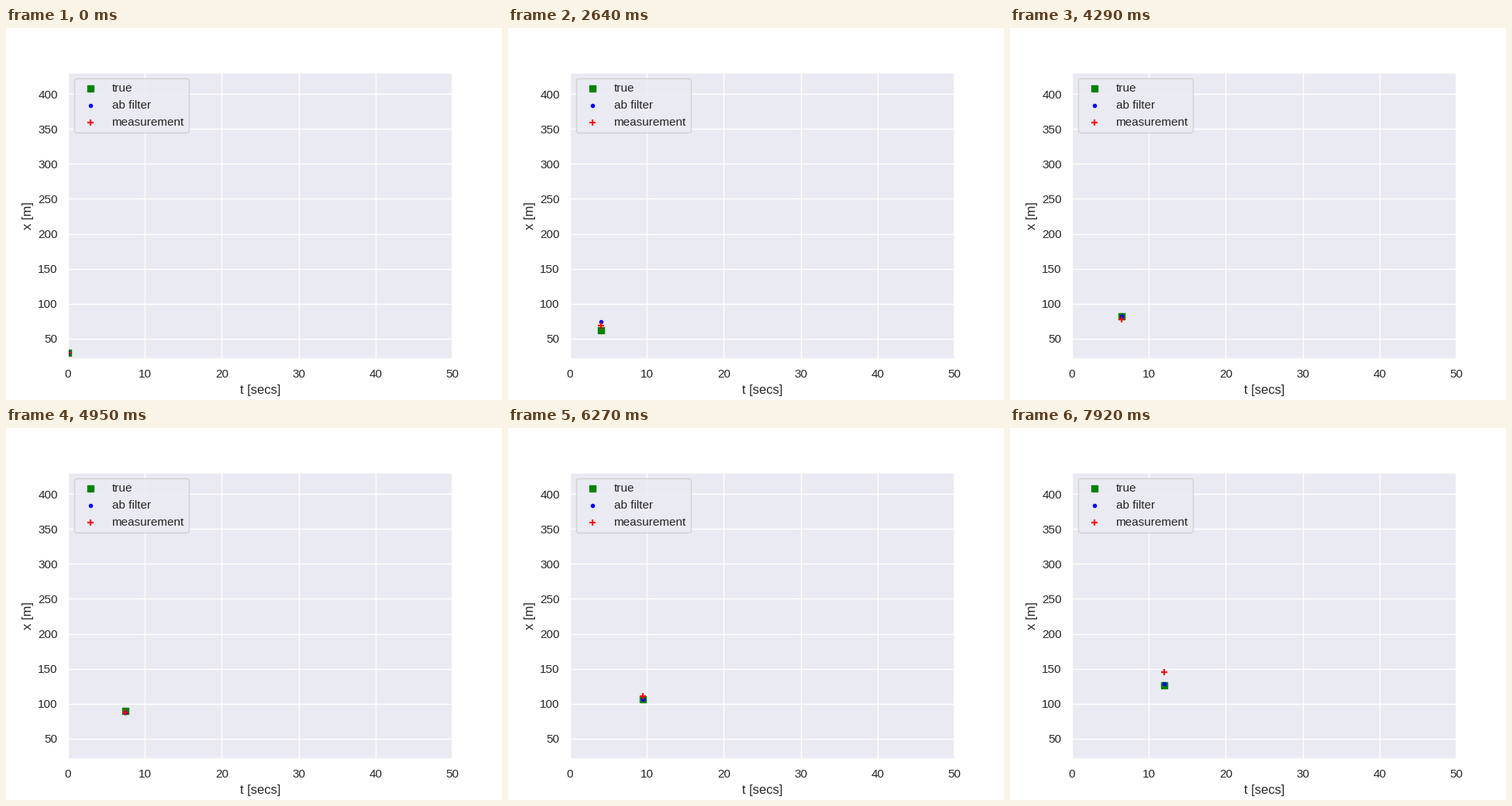
Recreate the animation shown at these times as a matplotlib script. Size 640 by 480 pixels, loop 8000 ms.

```python
import numpy as np
import matplotlib.pyplot as plt
from matplotlib.animation import FuncAnimation

INK = "0.15"
plt.rcParams.update({
    "font.family": "Liberation Sans",
    "text.color": INK,
    "axes.labelcolor": INK,
    "axes.labelsize": 12,
    "axes.facecolor": "#EAEAF2",
    "axes.edgecolor": "white",
    "axes.linewidth": 1.25,
    "axes.axisbelow": True,
    "axes.grid": True,
    "grid.color": "white",
    "grid.linewidth": 1,
    "lines.linewidth": 1.5,
    "lines.markersize": 6,
    "legend.fontsize": 11,
    "legend.scatterpoints": 1,
})
for axis, side in (("xtick", "bottom"), ("ytick", "left")):
    plt.rcParams.update({
        f"{axis}.color": INK,
        f"{axis}.labelsize": 11,
        f"{axis}.major.size": 6,
        f"{axis}.{side}": False,
    })

DT = 0.5                # seconds of simulated time per step
START, SPEED = 30, 8
ALPHA, BETA = 0.3, 0.1
STEP_MS, TICK_MS, LOOP_MS = 330, 40, 8000
Y_MIN, Y_SPAN = 20.66, 410

NOISE = np.array([0, -6, 13, -10, 5.5, 22, 17, 7.5, 6.2, -13, -4, 11.2, 2,
                  -5, 1, -2.2, 9.9, -4, -1, 4.5, -10, 7.6, 7, -19.7, 19])


def ab_filter(zs, x, v):
    """Alpha-beta estimates of position for the measurements zs."""
    out = [x]
    for z in zs[1:]:
        x += v * DT
        r = z - x
        x += ALPHA * r
        v += BETA / DT * r
        out.append(x)
    return np.array(out)


t = np.arange(len(NOISE)) * DT
true = START + SPEED * t
measured = true + NOISE
estimate = ab_filter(measured, START, SPEED)

fig, ax = plt.subplots(figsize=(6.4, 4.8), dpi=100)
ax.set(xlim=(0, 50), ylim=(Y_MIN, Y_MIN + Y_SPAN),
       xlabel="t [secs]", ylabel="x [m]")

series = [
    (true, ax.scatter([], [], c="green", marker="s", label="true")),
    (estimate, ax.scatter([], [], c="blue", marker=".", label="ab filter")),
    (measured, ax.scatter([], [], c="red", marker="+", label="measurement")),
]
ax.legend(loc="upper left")


def draw(n):
    # a step shows from the tick during which it falls due
    k = min((n * TICK_MS + TICK_MS - 1) // STEP_MS, len(t) - 1)
    for values, dots in series:
        dots.set_offsets([[t[k], values[k]]])
    return [dots for _, dots in series]


anim = FuncAnimation(fig, draw, frames=LOOP_MS // TICK_MS, interval=TICK_MS,
                     repeat=True, repeat_delay=0)
plt.show()
```
